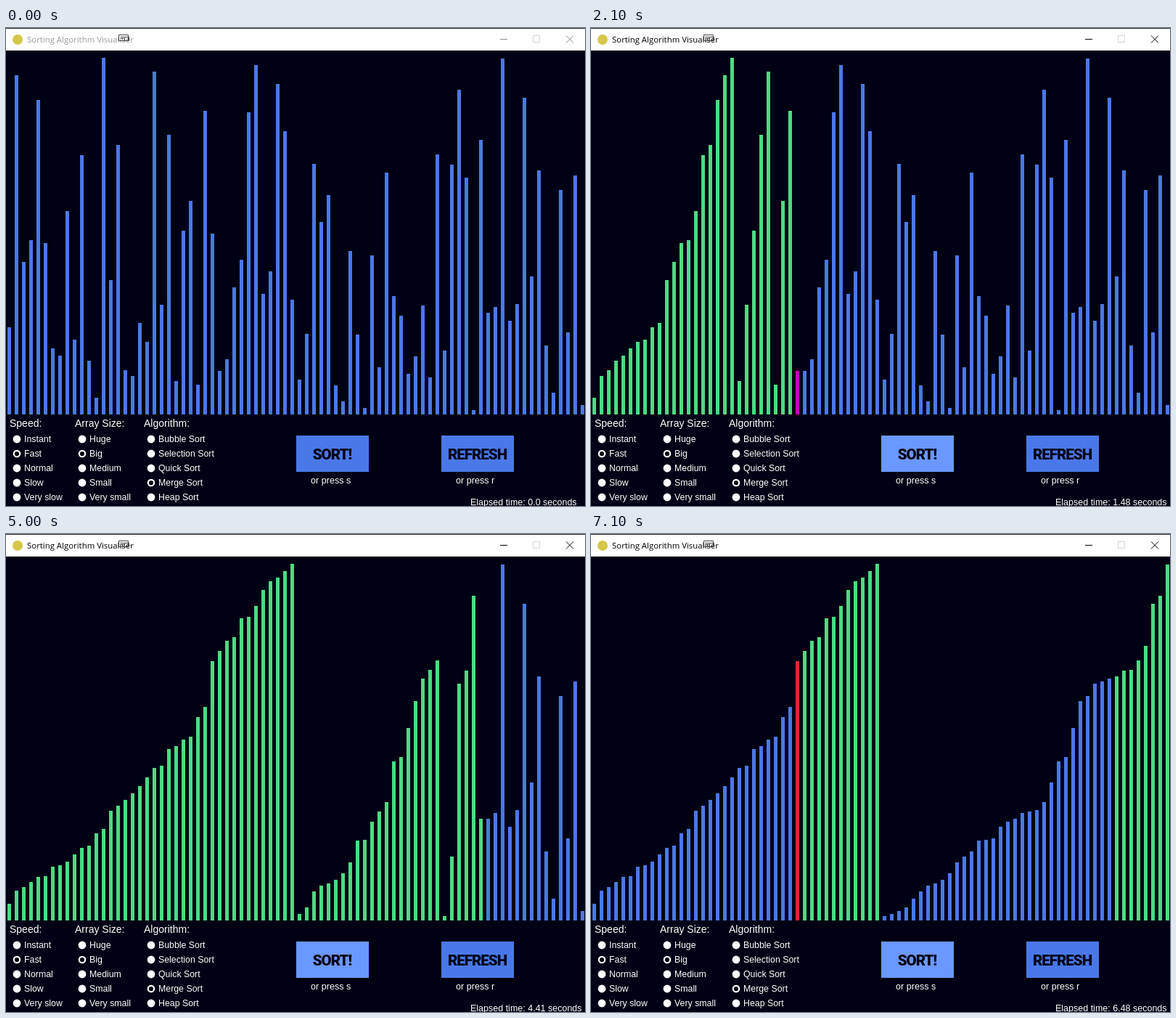
An HTML page that plays this animation: 798 by 658 pixels, repeating every 7.2 s.

```html
<!DOCTYPE html>
<html lang="en">
<head>
<meta charset="utf-8">
<title>Sorting Algorithm Visualiser</title>
<style>
html, body { margin: 0; width: 100%; height: 100%; overflow: hidden; background: #000014; }
svg { display: block; }
text { font-family: "Liberation Sans", Arial, sans-serif; fill: #fff; white-space: pre; }
.title { font: 11.4px "Open Sans", "Noto Sans", sans-serif; }
.button { font: 900 20.5px Roboto, sans-serif; letter-spacing: -1px; fill: #000014; text-anchor: middle; }
</style>
</head>
<body>
<svg id="stage" width="798" height="658" viewBox="0 0 798 658"></svg>
<script>
const LOOP = 7200, TICK = 100, BASE = 532;
const HOVER_AT = 300, ACTIVE_AT = 600;
const BLUE = '#4a78e8', GREEN = '#4adc82', RED = '#e02434', MAGENTA = '#c000c0';
const BRIGHT = '#6b98ff', BG = '#000014';

// top edge of each bar before sorting
const tops = [
  412, 65, 322, 292, 99, 296, 441, 451, 252, 429, 175, 458, 509, 41, 347, 161, 471, 479, 406, 432,
  60, 381, 147, 486, 279, 238, 491, 114, 283, 472, 456, 357, 319, 116, 51, 366, 335, 77, 142, 374,
  484, 421, 187, 267, 230, 492, 514, 307, 422, 523, 313, 467, 199, 369, 396, 476, 452, 382, 481, 174,
  444, 188, 85, 206, 526, 154, 392, 384, 42, 403, 380, 96, 342, 196, 437, 502, 223, 419, 203, 519
];

const stage = document.getElementById('stage');
function add(tag, attrs, text) {
  const el = document.createElementNS('http://www.w3.org/2000/svg', tag);
  for (const k in attrs) el.setAttribute(k, attrs[k]);
  if (text !== undefined) el.textContent = text;
  stage.appendChild(el);
  return el;
}
const rect = (x, y, width, height, fill) =>
  add('rect', { x, y, width, height, fill, 'shape-rendering': 'crispEdges' });
const label = (x, y, size, text) => add('text', { x, y, 'font-size': size }, text);

// every drawn step of the merge sort
function record() {
  const vals = tops.slice(), cols = vals.map(() => BLUE), steps = [];
  const snap = key => steps.push({ key, vals: vals.slice(), cols: cols.slice() });

  function merge(l, mid, r) {
    const out = [], name = l + '-' + r;
    let i = l, j = mid + 1;
    const take = p => {
      cols[p] = BLUE;
      snap(name + ' take ' + out.length);
      out.push(vals[p]);
    };
    while (i <= mid && j <= r) {
      cols[i] = cols[j] = RED;
      snap(name + ' compare ' + out.length);
      take(vals[i] >= vals[j] ? i++ : j++);
    }
    while (i <= mid) take(i++);
    while (j <= r) take(j++);
    out.forEach((v, n) => {
      vals[l + n] = v;
      cols[l + n] = MAGENTA;
      snap(name + ' write ' + n);
      cols[l + n] = GREEN;
      snap(name + ' done ' + n);
    });
  }
  function sort(l, r) {
    if (l >= r) return;
    const mid = (l + r) >> 1;
    sort(l, mid);
    sort(mid + 1, r);
    merge(l, mid, r);
  }
  snap('start');
  sort(0, vals.length - 1);
  return steps;
}

const steps = record();
// time in ms, shown seconds, step reached
const marks = [
  [620, 0, 'start'],
  [1500, 0.88, '10-19 write 0'],
  [2800, 2.19, '20-39 compare 2'],
  [3700, 3.08, '40-41 done 0'],
  [5000, 4.41, '65-66 done 0'],
  [6200, 5.6, '40-79 take 20'],
  [7100, 6.48, '0-79 take 59']
].map(([t, sec, key]) => ({ t, sec, step: steps.findIndex(s => s.key === key) }));

function progress(t) {
  if (t <= marks[0].t) return marks[0];
  let n = 1;
  while (n < marks.length - 1 && t > marks[n].t) n++;
  const a = marks[n - 1], b = marks[n], f = (t - a.t) / (b.t - a.t);
  return { sec: a.sec + (b.sec - a.sec) * f, step: Math.round(a.step + (b.step - a.step) * f) };
}

function seconds(s) {
  const n = Number(s.toFixed(2));
  return Number.isInteger(n) ? n + '.0' : String(n);
}

// window frame
rect(0, 0, 798, 658, BG);
rect(0, 0, 798, 31, '#fff');
rect(0, 0, 798, 1, '#222');
add('circle', { cx: 16, cy: 16, r: 7, fill: '#d6c64a' });
const title = add('text', { x: 29, y: 20, class: 'title' }, 'Sorting Algorithm Visualiser');
add('path', { d: 'M155.5 9.5h13v8h-13zM158 12.5h5M158 14.5h4M163.5 12.5h6v5h-6z', fill: 'none', stroke: '#444' });
const controls = add('path', { d: 'M681 15.5h10M772 10.5l10 10M782 10.5l-10 10', fill: 'none' });
add('path', { d: 'M726.5 10.5h9v9h-9z', fill: 'none', stroke: '#d4d4d4' });

// option lists
function options(x, head, names, chosen) {
  label(x, 549, 14, head);
  names.forEach((name, n) => {
    const cy = 566 + 20 * n, cx = x + 10;
    add('circle', n === chosen
      ? { cx, cy, r: 4.2, fill: BG, stroke: '#fff', 'stroke-width': 2.2 }
      : { cx, cy, r: 5.4, fill: '#fff' });
    label(x + 20, cy + 4, 12.35, name);
  });
}
options(5, 'Speed:', ['Instant', 'Fast', 'Normal', 'Slow', 'Very slow'], 1);
options(95, 'Array Size:', ['Huge', 'Big', 'Medium', 'Small', 'Very small'], 1);
options(190, 'Algorithm:', ['Bubble Sort', 'Selection Sort', 'Quick Sort', 'Merge Sort', 'Heap Sort'], 3);

function button(x, text, hint) {
  const box = rect(x, 561, 100, 50, BLUE);
  add('text', { x: x + 49.5, y: 594, class: 'button' }, text);
  label(x + 20, 627, 12.6, hint);
  return box;
}
const sortBox = button(400, 'SORT!', 'or press s');
button(600, 'REFRESH', 'or press r');
const clock = label(640, 657, 12.5, '');
const bars = tops.map((y, n) => rect(2 + 10 * n, y, 5, BASE - y, BLUE));

function draw(t) {
  const { sec, step } = progress(t), { vals, cols } = steps[step];
  bars.forEach((bar, n) => {
    bar.setAttribute('y', vals[n]);
    bar.setAttribute('height', BASE - vals[n]);
    bar.setAttribute('fill', cols[n]);
  });
  const active = t >= ACTIVE_AT;
  title.style.fill = active ? '#000' : '#999';
  controls.setAttribute('stroke', active ? '#000' : '#888');
  sortBox.setAttribute('fill', t >= HOVER_AT ? BRIGHT : BLUE);
  clock.textContent = 'Elapsed time: ' + seconds(sec) + ' seconds';
}

const begin = performance.now();
function frame(now) {
  const t = Math.max(0, now - begin) % LOOP;
  draw(Math.floor(t / TICK) * TICK);
  requestAnimationFrame(frame);
}
draw(0);
requestAnimationFrame(frame);
</script>
</body>
</html>
```
